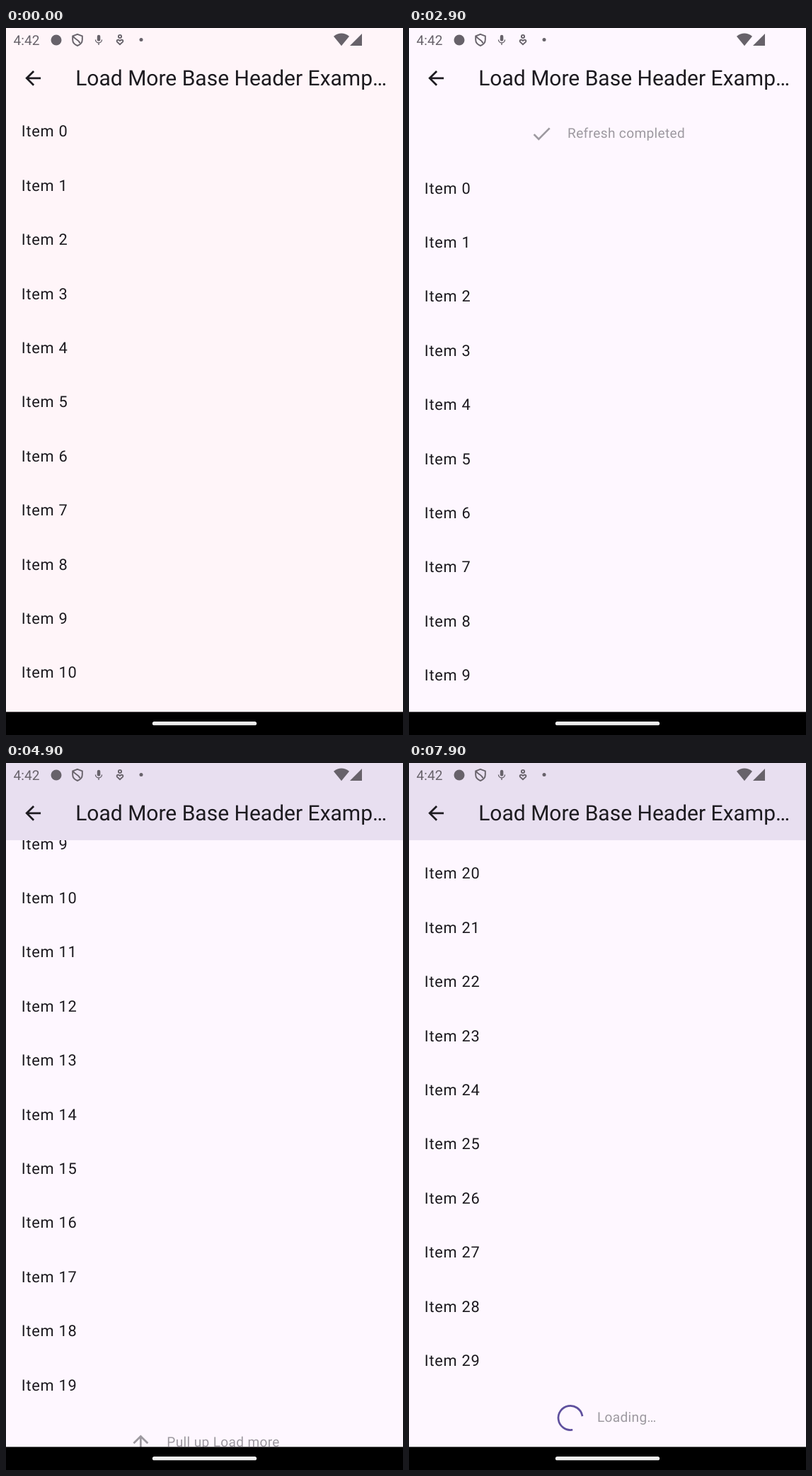
Animation, 561 px wide and 998 px high, one loop 8000 ms. Source, as an HTML page:

```html
<!DOCTYPE html>
<html lang="en">
<head>
<meta charset="utf-8">
<title>Pull to refresh list</title>
<style>
  html, body { margin: 0; width: 100%; height: 100%; overflow: hidden; }
  body { font-family: Roboto, "Open Sans", sans-serif; color: #1d1b20; text-rendering: geometricPrecision; }
  #stage { position: relative; width: 561px; height: 998px; overflow: hidden; }
  #stage > * { position: absolute; left: 0; top: 0; width: 561px; }
  #list p {
    position: absolute; left: 21.83px; top: 0; margin: 0;
    font-size: 21.83px; letter-spacing: .682px; line-height: 76.4px; white-space: pre;
  }
  #stage > .row {
    height: 81.86px;
    display: flex; align-items: center; justify-content: center; gap: 20.46px;
    font-size: 19.1px; letter-spacing: .341px; color: #9d99a0; white-space: pre;
  }
  .row svg { flex: none; overflow: visible; }
  #bar { height: 109px; }
  #nav { height: 998px; }
</style>
</head>
<body>
<div id="stage">
  <div id="list"></div>
  <div id="head" class="row"></div>
  <div id="foot" class="row"></div>
  <svg id="bar" viewBox="0 0 561 109">
    <g fill="#67626a">
      <text x="10.6" y="23.8" font-size="19.1">4:42</text>
      <circle cx="71" cy="17" r="7.5"/>
      <g fill="none" stroke="#67626a" stroke-width="1.9">
        <path d="M101 8.8l6.8 2.6v5.2c0 4-2.8 7-6.8 8.4c-4-1.4-6.8-4.4-6.8-8.4v-5.2z"/>
        <path d="M95 11.5c1 4.5 7.5 4 9.5 10"/>
        <circle cx="161" cy="12" r="2.1"/>
        <path d="M161 23.3l-3.9-3.7c-1.7-2.2 1.6-4.3 3.9-1.6c2.3-2.7 5.6-.6 3.9 1.6z"/>
      </g>
      <rect x="128.8" y="9.8" width="4.5" height="8.8" rx="2.2"/>
      <path d="M126.5 16.400a4.500 4.500 0 0 0 9 0M131 21v3" fill="none" stroke="#67626a" stroke-width="1.4"/>
      <circle cx="191" cy="16.5" r="2.5"/>
      <path d="M463 11.800Q474 3.400 485 11.800L474 25.200z"/>
      <path d="M486 25L503 8V25z"/>
    </g>
    <path fill="#1d1b20" transform="translate(21.8 54.5) scale(1.364)" d="M20 11H7.83l5.59-5.59L12 4l-8 8 8 8 1.41-1.41L7.83 13H20z"/>
    <text x="98.2" y="81.1" font-size="30.01" fill="#1d1b20">Load More Base Header Examp…</text>
  </svg>
  <svg id="nav" viewBox="0 0 561 998">
    <rect y="965.4" width="561" height="33"/>
    <rect x="206.85" y="978.9" width="147.3" height="5.46" rx="2.73" fill="#eee"/>
  </svg>
</div>
<script>
const LOOP = 8000, STEP = 100, PITCH = 76.4, TOP = 109.4, ROW = 81.86, TRIGGER = 109;
const PAGE = 10 * PITCH, REST = 754, HOLD = 82, OVER = 15;
const REFRESH = 1267, REFRESHED = 2300, LOAD_1 = 5488, LOADED = 6490, LOAD_2 = 7170;

const clamp = x => Math.min(1, Math.max(0, x));
const sine = p => Math.sin(p * Math.PI / 2);
const smooth = p => p * p * (3 - 2 * p);
const spring = p => p < 1 ? 1 - (1 + 8 * p) * Math.exp(-8 * p) : 1;

// Every gesture adds its distance to the scroll offset: start, end, distance, easing.
const MOVES = [
  [784, 1200, -140, sine],
  [REFRESH, 1934, 140 - HOLD, spring],
  [2880, 3607, HOLD, spring],
  [4227, 5000, REST, smooth],
  [5200, 5300, OVER, smooth],
  [LOAD_1, 5932, -OVER, spring],
  [LOADED, 6700, PAGE, smooth],
  [7000, 7100, OVER, smooth],
  [LOAD_2, 7614, -OVER, spring]
];
const scrollAt = t => MOVES.reduce((sum, [a, b, d, ease]) => sum + d * ease(clamp((t - a) / (b - a))), 0);

const ICONS = {
  down: "M20 12l-1.41-1.41L13 16.17V4h-2v12.17l-5.58-5.59L4 12l8 8z",
  up: "M4 12l1.41 1.41L11 7.83V20h2V7.83l5.58 5.59L20 12l-8-8z",
  done: "M9 16.2L4.8 12l-1.4 1.4L9 19 21 7l-1.4-1.4z",
  refresh: "M17.65 6.35A8 8 0 1 0 19.73 14h-2.08A6 6 0 1 1 16.22 7.78L13 11h7V4z",
  renew: "M12 6v3l4-4-4-4v3a8 8 0 0 0-6.76 12.26L6.7 14.8A6 6 0 0 1 12 6zm6.76 1.74L17.3 9.2A6 6 0 0 1 12 18v-3l-4 4 4 4v-3a8 8 0 0 0 6.76-12.26z"
};

const $ = id => document.getElementById(id);
const stage = $("stage"), list = $("list"), head = $("head"), foot = $("foot"), bar = $("bar");
const moveY = (el, y) => { el.style.transform = `translateY(${y.toFixed(2)}px)`; };

const items = Array.from({ length: 30 }, (_, i) => {
  const p = document.createElement("p");
  p.textContent = "Item " + i;
  moveY(p, i * PITCH);
  return list.appendChild(p);
});

// cubic-bezier(.4, 0, .2, 1), solved by bisection
function fastOutSlowIn(x) {
  let lo = 0, hi = 1;
  for (let i = 0; i < 20; i++) {
    const s = (lo + hi) / 2;
    const bx = 1.2 * s * (1 - s) ** 2 + .6 * s * s * (1 - s) + s ** 3;
    if (bx < x) lo = s; else hi = s;
  }
  return smooth(lo);
}

// Indeterminate ring: the lead runs ahead, then the tail catches up, while all of it turns.
function ringPath(ms) {
  const c = ms / 1333 % 1, turn = ms / 2222, r = 17.05;
  const lead = fastOutSlowIn(clamp(c * 2)), tail = fastOutSlowIn(clamp(c * 2 - 1));
  const start = Math.PI * (-.5 + 1.5 * tail + 2 * turn + .5 * c);
  const sweep = Math.max(1.5 * Math.PI * (lead - tail), .001);
  const at = a => `${(r + r * Math.cos(a)).toFixed(3)} ${(r + r * Math.sin(a)).toFixed(3)}`;
  return `M${at(start)}A${r} ${r} 0 ${sweep > Math.PI ? 1 : 0} 1 ${at(start + sweep)}`;
}

function setRow(el, icon, text, ms) {
  if (el.dataset.text !== text) {
    el.dataset.text = text;
    el.innerHTML = (icon === "ring"
      ? '<svg width="34.1" height="34.1"><path fill="none" stroke="#5f509e" stroke-width="2.73" stroke-linecap="square"/></svg>'
      : `<svg width="32.74" height="32.74" viewBox="0 0 24 24"><path fill="#9d99a0" d="${ICONS[icon]}"/></svg>`)
      + `<span>${text}</span>`;
  }
  if (icon === "ring") el.querySelector("path").setAttribute("d", ringPath(ms));
}

function drawHead(t, pos) {
  moveY(head, TOP - pos - ROW);
  head.style.visibility = pos < 0 ? "visible" : "hidden";
  if (t >= REFRESHED) setRow(head, "done", "Refresh completed");
  else if (t >= REFRESH) setRow(head, "ring", "Refreshing…", t - REFRESH);
  else if (-pos > TRIGGER) setRow(head, "refresh", "Release to refresh");
  else setRow(head, "down", "Pull down Refresh");
}

function drawFoot(t, pos, end) {
  moveY(foot, TOP + end - pos);
  const start = t >= LOAD_2 ? LOAD_2 : t >= LOAD_1 && t < LOADED ? LOAD_1 : 0;
  if (start) setRow(foot, "ring", "Loading…", t - start);
  else if (pos > end - 770) setRow(foot, "renew", "Release to load more");
  else setRow(foot, "up", "Pull up Load more");
}

function draw(t) {
  const pos = scrollAt(t), count = t < LOADED ? 20 : 30;
  moveY(list, TOP - pos);
  items.forEach((p, i) => { p.style.display = i < count ? "" : "none"; });
  drawHead(t, pos);
  drawFoot(t, pos, count * PITCH);
  const k = clamp(t / 400);
  const back = `rgb(${255 - k},${245 + 2 * k},${249 + 6 * k})`;
  stage.style.background = back;
  bar.style.background = pos > .5 ? "#e8dff0" : back;
}

const begin = performance.now();
function tick() {
  const t = (performance.now() - begin) % LOOP;
  draw(Math.floor(t / STEP) * STEP);
  requestAnimationFrame(tick);
}
tick();
</script>
</body>
</html>
```
